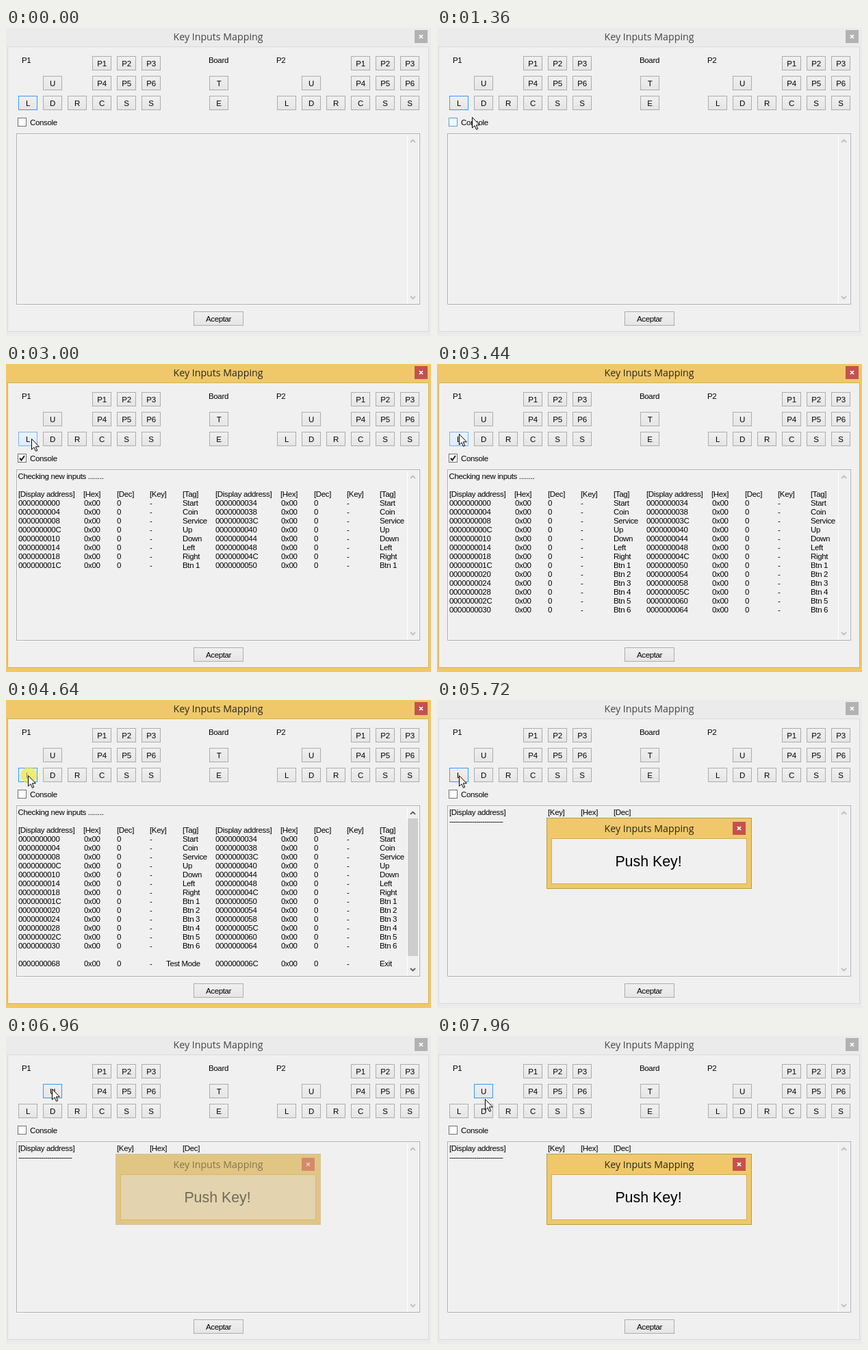
Recreate the animation shown at these times as an HTML page with a canvas. Size 621x450 px, loop 8 s.

```html
<!DOCTYPE html>
<html lang="en">
<head>
<meta charset="utf-8">
<title>Key Inputs Mapping</title>
<style>
html, body { margin: 0; width: 100%; height: 100%; overflow: hidden; background: #ebebeb; }
canvas { display: block; }
</style>
</head>
<body>
<canvas id="stage" width="621" height="450"></canvas>
<script>
const ctx = document.getElementById('stage').getContext('2d');
const LOOP = 8000;
const GOLD = '#f0c869';
const UI_FONT = '11.5px "Liberation Sans", sans-serif';
const TITLE_FONT = '14.2px "Open Sans", sans-serif';
const TAGS = ['Start', 'Coin', 'Service', 'Up', 'Down', 'Left', 'Right',
  ...[1, 2, 3, 4, 5, 6].map(n => 'Btn ' + n)];
const BOX = { x: 15, y: 154, w: 590, h: 250 };

// Cursor waypoints: time, x, y
const PATH = [
  [480, 200, 409], [560, 190, 330], [640, 185, 300], [800, 185, 300], [1360, 51, 130],
  [2640, 51, 130], [3120, 32, 102], [3560, 32, 102], [3760, 32, 104], [3880, 32, 104],
  [3920, 32, 105], [4040, 32, 105], [4240, 32, 110], [6080, 32, 110],
  [6400, 67, 78], [6480, 67, 77], [7760, 67, 77], [7960, 70, 92]
];
const CLICKS = [[1440, 1600], [4640, 4760], [6800, 6960]];

const pad = [
  ['P1', 3, 0], ['P2', 4, 0], ['P3', 5, 0],
  ['U', 1, 1], ['P4', 3, 1], ['P5', 4, 1], ['P6', 5, 1],
  ['L', 0, 2], ['D', 1, 2], ['R', 2, 2], ['C', 3, 2], ['S', 4, 2], ['S', 5, 2]
];
const padButtons = (left, player) => pad.map(([label, col, row]) =>
  ({ label, id: player + label, x: left + col * 36, y: 41 + row * 29, w: 28, h: 21 }));
const BUTTONS = [
  ...padButtons(18, 1), ...padButtons(396, 2),
  { label: 'T', x: 297, y: 70, w: 28, h: 21 },
  { label: 'E', x: 297, y: 99, w: 28, h: 21 },
  { label: 'Aceptar', x: 274, y: 414, w: 73, h: 21 }
];

const within = (t, from, to) => t >= from && t < to;
const inside = (p, r) => p && p.x >= r.x && p.x < r.x + r.w && p.y >= r.y && p.y < r.y + r.h;

function fill(x, y, w, h, color) {
  ctx.fillStyle = color;
  ctx.fillRect(x, y, w, h);
}

function frame(x, y, w, h, border, inner) {
  fill(x, y, w, h, border);
  fill(x + 1, y + 1, w - 2, h - 2, inner);
}

function text(str, x, y, { align = 'left', font = UI_FONT, spacing = -0.35, color = '#000' } = {}) {
  ctx.font = font;
  ctx.letterSpacing = spacing + 'px';
  ctx.textAlign = align;
  ctx.fillStyle = color;
  ctx.fillText(str, x, y);
}

function line(points, color, width) {
  ctx.beginPath();
  points.forEach(([x, y]) => ctx.lineTo(x, y));
  ctx.strokeStyle = color;
  ctx.lineWidth = width;
  ctx.stroke();
}

function cursorAt(t) {
  if (t < PATH[0][0]) return null;
  const next = PATH.findIndex(p => p[0] > t);
  const [t1, x1, y1] = PATH[next < 0 ? PATH.length - 1 : next];
  if (next < 0) return { x: x1, y: y1 };
  const [t0, x0, y0] = PATH[next - 1];
  const k = (t - t0) / (t1 - t0);
  return { x: Math.round(x0 + (x1 - x0) * k), y: Math.round(y0 + (y1 - y0) * k) };
}

function closeButton(x, y, color) {
  fill(x, y, 19, 19, color);
  line([[x + 7, y + 7], [x + 12, y + 12]], '#fff', 1.7);
  line([[x + 12, y + 7], [x + 7, y + 12]], '#fff', 1.7);
}

function title(x, y, color) {
  text('Key Inputs Mapping', x, y, { align: 'center', font: TITLE_FONT, spacing: 0, color });
}

function drawWindow(active) {
  fill(0, 0, 621, 450, active ? GOLD : '#ebebeb');
  frame(2, 27, 616, 417, active ? '#d3b05c' : '#d9d9d9', '#f0f0f0');
  title(310, 18, active ? '#2b2618' : '#444');
  closeButton(597, 3, active ? '#c75050' : '#b2b2b2');
  text('P1', 23, 51);
  text('Board', 296, 51);
  text('P2', 395, 51);
}

function drawButton(b, hovered, focused) {
  const shade = ctx.createLinearGradient(0, b.y, 0, b.y + b.h);
  shade.addColorStop(0, hovered ? '#ecf4fc' : '#f0f0f0');
  shade.addColorStop(1, hovered ? '#dcecfc' : '#e5e5e5');
  frame(b.x, b.y, b.w, b.h, focused ? '#3399ff' : hovered ? '#7eb4ea' : '#acacac', shade);
  text(b.label, b.x + b.w / 2, b.y + 15, { align: 'center' });
}

function drawCheckbox(checked, hovered) {
  frame(17, 131, 13, 13, hovered ? '#5a9fdc' : '#707070', hovered ? '#f0f8ff' : '#fff');
  if (checked) line([[20, 137.5], [22.5, 140.5], [27, 134]], '#212121', 2);
  text('Console', 35, 142);
}

function drawTextBox(hovered, scrollable) {
  frame(BOX.x, BOX.y, BOX.w, BOX.h, hovered ? '#7eb4ea' : '#abadb3', '#fff');
  fill(17, 156, 569, 246, '#f0f0f0');
  fill(587, 156, 16, 246, '#f0f0f0');
  const arrow = scrollable ? '#606060' : '#bfbfbf';
  line([[591, 167], [594.5, 163.5], [598, 167]], arrow, 1.8);
  line([[591, 392], [594.5, 395.5], [598, 392]], arrow, 1.8);
  if (scrollable) fill(587, 173, 15, 201, '#cdcdcd');
}

function put(row, cells) {
  cells.forEach(([str, x]) => text(str, x, 168 + row * 13));
}

const address = n => n.toString(16).toUpperCase().padStart(10, '0');
const entry = (n, x, tag, tagX = x + 240) =>
  [[address(n), x], ['0x00', x + 96], ['0', x + 144], ['-', x + 192], [tag, tagX]];
const rowTime = n => [2160, 2200, 2360, 2440][n] ?? 2600 + (n - 4) * 105;

function drawConsole(t) {
  const dots = Math.max(0, Math.min(8, Math.floor(4 + (t - 1680) / 50)));
  put(0, [['Checking new inputs ' + '.'.repeat(dots), 17.5]]);
  if (t < rowTime(0)) return;
  for (const x of [18, 306])
    put(2, [['[Display address]', x], ['[Hex]', x + 95], ['[Dec]', x + 144],
      ['[Key]', x + 192], ['[Tag]', x + 240]]);
  TAGS.forEach((tag, n) => {
    if (t >= rowTime(n)) put(3 + n, [...entry(n * 4, 18, tag), ...entry(52 + n * 4, 306, tag)]);
  });
  if (t >= 3600) put(17, [...entry(104, 18, 'Test Mode', 234), ...entry(108, 306, 'Exit')]);
}

function drawMapping(t) {
  put(0, [['[Display address]', 18], ['[Key]', 162], ['[Hex]', 210], ['[Dec]', 258]]);
  text('-'.repeat(26), 18, 181, { spacing: -0.83 });
  if (within(t, 6080, 6960)) put(1, [['Left', 162], ['37', 210], ['0x25', 258]]);
}

function drawDialog(alpha) {
  ctx.save();
  ctx.globalAlpha = alpha;
  frame(160, 172, 300, 104, '#b99a50', GOLD);
  frame(167, 202, 286, 67, '#d0ad5a', '#f0f0f0');
  title(310, 193, '#2b2618');
  closeButton(432, 178, '#c75050');
  text('Push Key!', 309, 243,
    { align: 'center', font: '21.33px "Liberation Sans", sans-serif', spacing: 0 });
  ctx.restore();
}

function drawClick(p) {
  ctx.beginPath();
  ctx.arc(p.x + 1.5, p.y, 12, 0, Math.PI * 2);
  ctx.fillStyle = 'rgba(242, 232, 50, .65)';
  ctx.fill();
}

const ARROW = new Path2D('M.5 .5V16L4 12.7L6.5 18.3L8.7 17.4L6.3 11.8H11.3Z');
const IBEAM = new Path2D('M-3 -8H-1L0 -7L1 -8H3M0 -7V7M-3 8H-1L0 7L1 8H3');

function drawCursor(p, overText) {
  ctx.save();
  ctx.translate(p.x, p.y);
  ctx.strokeStyle = '#000';
  ctx.lineWidth = 1;
  if (overText) {
    ctx.translate(0.5, 0.5);
    ctx.stroke(IBEAM);
  } else {
    ctx.fillStyle = '#fff';
    ctx.fill(ARROW);
    ctx.stroke(ARROW);
  }
  ctx.restore();
}

function draw(t) {
  const dialog = within(t, 4760, 6080) || t >= 6960;
  const cursor = cursorAt(t);
  const hover = dialog ? null : cursor;
  const focus = t < 1440 || within(t, 4640, 6800) ? '1L' : t >= 6800 ? '1U' : 'none';
  const overText = inside(hover, BOX);

  drawWindow(t >= 1440 && !dialog);
  BUTTONS.forEach(b => drawButton(b, inside(hover, b), b.id === focus));
  drawCheckbox(within(t, 1600, 3680), t < 1600 && inside(hover, { x: 17, y: 129, w: 58, h: 17 }));
  drawTextBox(overText, within(t, 3600, 5720));
  if (within(t, 1600, 4760)) drawConsole(t);
  if (t >= 4760) drawMapping(t);
  if (dialog) drawDialog(within(t, 6960, 7040) ? 0.5 : 1);
  if (CLICKS.some(([from, to]) => within(t, from, to))) drawClick(cursor);
  if (cursor) drawCursor(cursor, overText);
}

const start = performance.now();
function tick() {
  const t = (performance.now() - start) % LOOP;
  draw(Math.floor(t / 40) * 40);
  requestAnimationFrame(tick);
}
tick();
</script>
</body>
</html>
```
